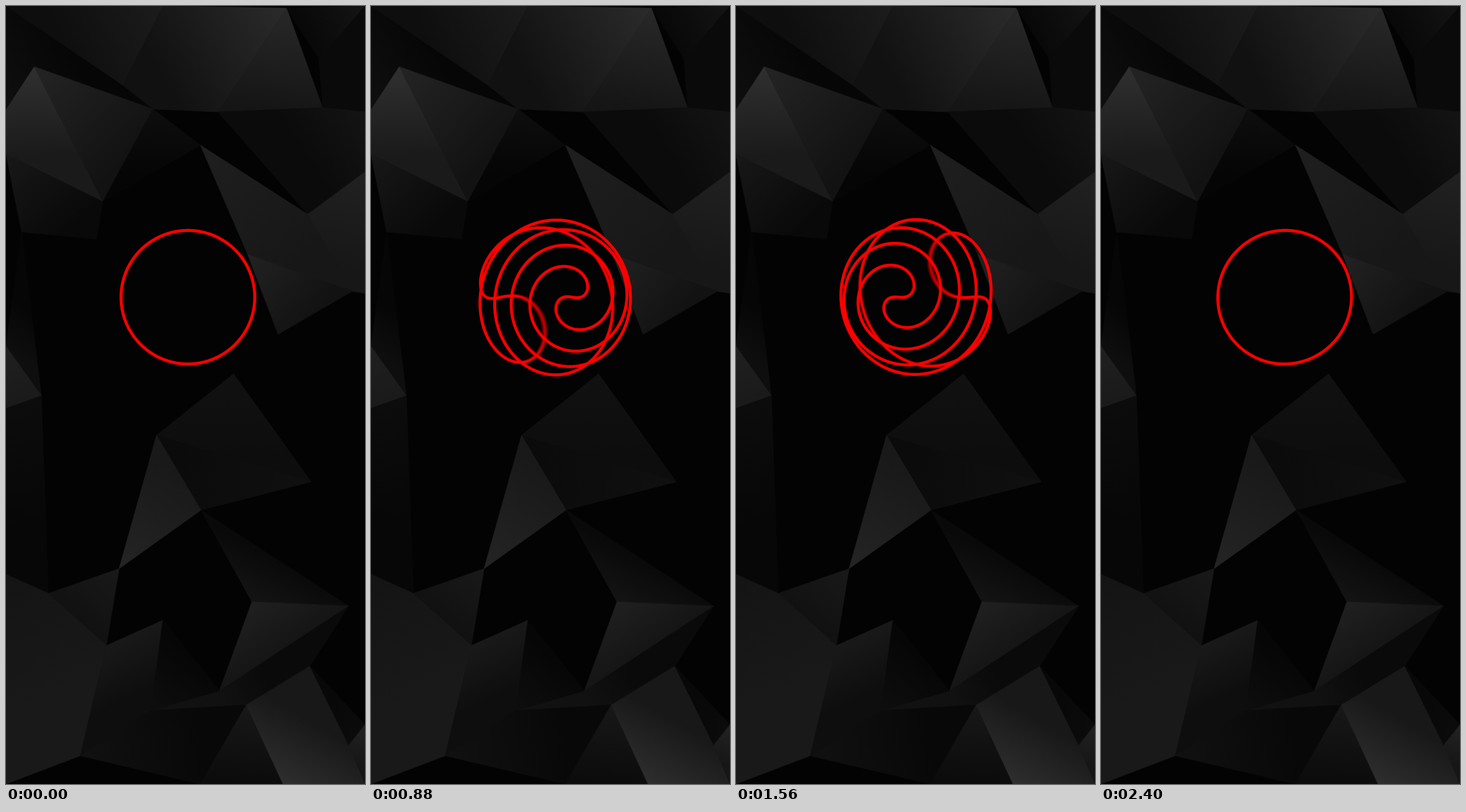
An HTML page with a canvas that plays this animation: 508 px wide and 1102 px high, repeating every 3.52 s.

```html
<!DOCTYPE html>
<html lang="en">
<head>
<meta charset="utf-8">
<title>Twisting ring</title>
<style>
  html, body { margin: 0; width: 100%; height: 100%; overflow: hidden; background: #030303; }
  canvas { display: block; width: 508px; height: 1102px; }
</style>
</head>
<body>
<canvas id="stage" width="508" height="1102"></canvas>
<script>
const W = 508, H = 1102;
const FRAME = 40, MOVING = 61, LOOP = 3520;
const CX = 257.7, CY = 412.5, R = 94.6;
const DEPTH = 0.512;         // perspective: ring radius over camera distance
const TWIST = 3 * Math.PI;   // greatest twist at each end of the axis
const SHUTTER = 0.25;        // share of a frame that is blurred
const SAMPLES = 15;
const POINTS = 1080;

const ctx = document.getElementById('stage').getContext('2d');

function layer() {
  const c = document.createElement('canvas');
  c.width = W;
  c.height = H;
  return c.getContext('2d');
}

const bg = layer(), ring = layer();

// Corners of the folded backdrop, shared by its facets
const corners = {
  a: [0, 0], b: [222, 0], c: [397, 3], d: [W, 0], e: [165, 112], f: [300, 150],
  g: [448, 144], h: [W, 150], i: [40, 86], j: [0, 147], k: [208, 146], l: [137, 277],
  m: [0, 210], n: [22, 320], p: [128, 330], q: [275, 197], r: [427, 295], s: [W, 235],
  t: [490, 404], u: [342, 352], v: [385, 465], w: [443, 75], x: [W, 407],
  A: [0, 482], B: [50, 552], C: [0, 570], D: [322, 521], E: [213, 608], F: [432, 674],
  G: [276, 714], H: [160, 797], I: [60, 832], J: [142, 906], K: [0, 805], L: [348, 844],
  M: [485, 850], N: [302, 970], O: [105, 1062], P: [205, 998], Q: [340, 990],
  R: [430, 935], S: [485, 1047], T: [392, H], U: [275, H], V: [W, 1018], X: [W, H],
  Y: [0, H], Z: [222, 870]
};

const gray = v => `rgb(${v},${v},${v})`;

// Shades a polygon from its first corner towards the middle of the others
function facet(names, from, to) {
  const pts = [...names].map(name => corners[name]);
  const rest = pts.slice(1);
  const mean = axis => rest.reduce((sum, p) => sum + p[axis], 0) / rest.length;
  const shade = bg.createLinearGradient(...pts[0], mean(0), mean(1));
  shade.addColorStop(0, gray(from));
  shade.addColorStop(1, gray(to));
  bg.fillStyle = bg.strokeStyle = shade;
  bg.lineWidth = 0.6;
  bg.beginPath();
  pts.forEach(p => bg.lineTo(...p));
  bg.closePath();
  bg.fill();
  bg.stroke();
}

function drawBackdrop() {
  bg.fillStyle = gray(3);
  bg.fillRect(0, 0, W, H);

  // top
  facet('jaeki', 15, 6);
  facet('bae', 28, 14);
  facet('cbekf', 43, 17);
  facet('cgf', 40, 21);
  facet('dcw', 20, 8);
  facet('hdwg', 10, 10);

  // upper half
  facet('ilmj', 48, 26);
  facet('ikl', 36, 18);
  facet('mlpn', 24, 9);
  facet('klq', 14, 5);
  facet('hsrfg', 20, 11);
  facet('qrtu', 31, 23);
  facet('srtx', 33, 23);
  facet('utv', 34, 18);

  // middle
  facet('AnB', 14, 6);
  facet('ABC', 32, 26);
  facet('CBIK', 12, 7);
  facet('DEF', 17, 13);
  facet('FEG', 16, 11);
  facet('HEG', 36, 25);
  facet('LGM', 20, 9);
  facet('LMN', 32, 21);

  // bottom
  facet('NMRQP', 17, 10);
  facet('HIJ', 25, 17);
  facet('KIJOY', 20, 25);
  facet('JZPO', 25, 14);
  facet('PZN', 14, 6);
  facet('OPQU', 17, 8);
  facet('QTU', 24, 11);
  facet('TXSRQ', 46, 24);
  facet('VSR', 11, 8);
  facet('VSX', 34, 22);
}

// Quadratic ease in and out
const ease = p => p < 0.5 ? 2 * p * p : 1 - 2 * (1 - p) * (1 - p);

// The ring turns half a round while it twists about its own axis and untwists
function traceRing(u) {
  const cosT = Math.cos(Math.PI * u), sinT = Math.sin(Math.PI * u);
  const twist = TWIST * ease(1 - Math.abs(1 - 2 * u));
  ring.beginPath();
  for (let i = 0; i < POINTS; i++) {
    const a = 2 * Math.PI * i / POINTS;
    const x = Math.cos(a), s = Math.sin(a);
    const y = s * Math.cos(twist * x);
    const z = -s * Math.sin(twist * x);
    const scale = R / (1 - DEPTH * (z * cosT - x * sinT));
    ring.lineTo(CX + scale * (x * cosT + z * sinT), CY + scale * y);
  }
  ring.closePath();
  ring.stroke();
}

function draw(step) {
  ring.clearRect(0, 0, W, H);
  ring.globalCompositeOperation = 'lighter';
  ring.globalAlpha = 1 / SAMPLES;
  ring.strokeStyle = '#f00';
  ring.lineWidth = 4.2;
  ring.lineJoin = 'round';
  for (let i = 0; i < SAMPLES; i++) {
    traceRing((step + SHUTTER * i / SAMPLES) / MOVING);
  }
  ctx.drawImage(bg.canvas, 0, 0);
  ctx.drawImage(ring.canvas, 0, 0);
}

let start = null, shown = -1;

function tick(now) {
  if (start === null) start = now;
  const time = Math.max(0, now - start) % LOOP;
  const step = Math.min(MOVING - 1, Math.floor(time / FRAME));
  if (step !== shown) {
    draw(step);
    shown = step;
  }
  requestAnimationFrame(tick);
}

drawBackdrop();
draw(0);
requestAnimationFrame(tick);
</script>
</body>
</html>
```
